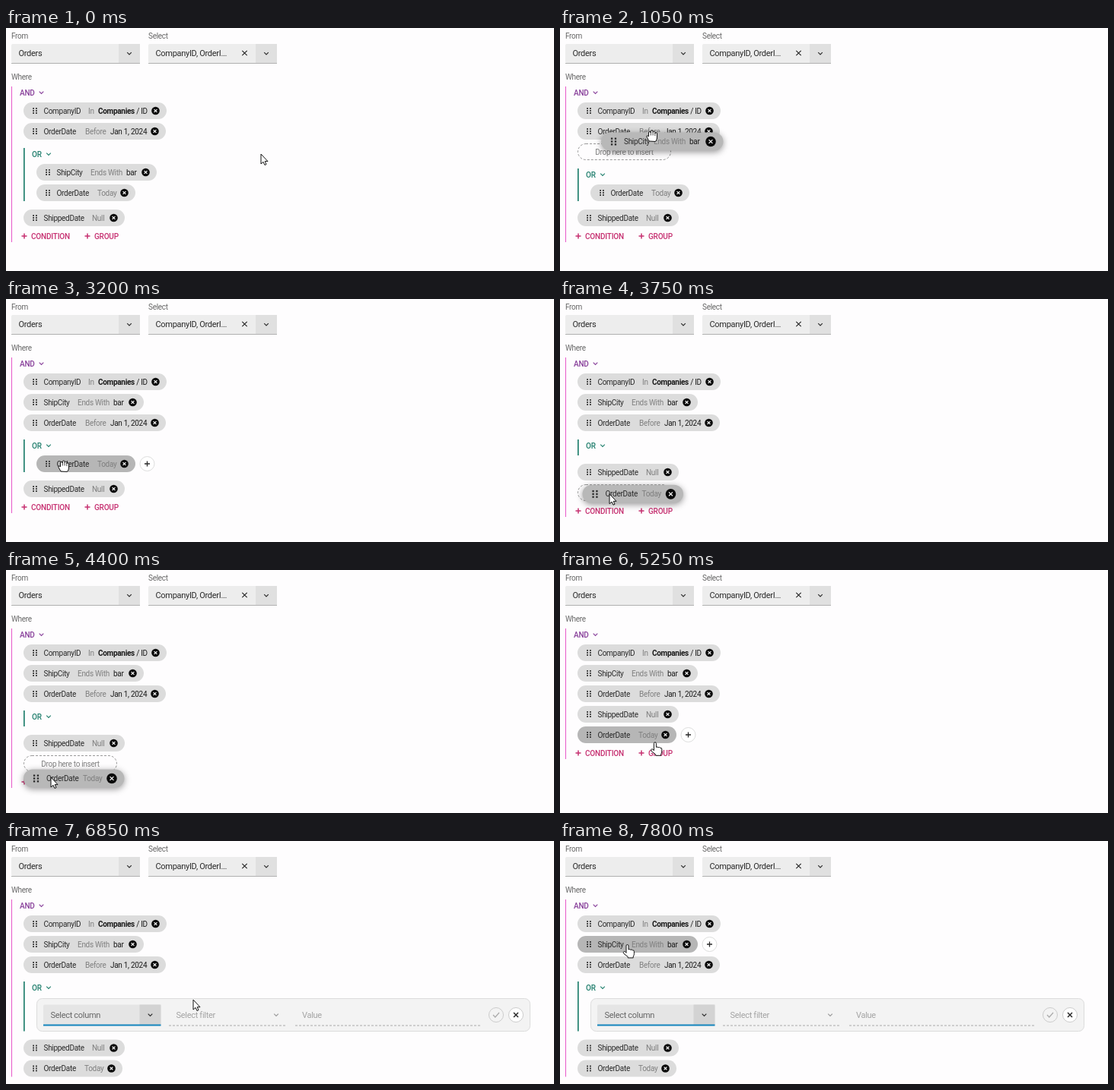
These frames come from a looping animation (720x320 px, 8000 ms). An HTML page:

```html
<!DOCTYPE html>
<html lang="en">
<head>
<meta charset="utf-8">
<title>Query builder</title>
<style>
  html, body { margin: 0; width: 100%; height: 100%; overflow: hidden; background: #fefdfe; }
  svg { display: block; width: 720px; height: 320px; }
  text { font: 10px Roboto, Arial, sans-serif; letter-spacing: -.3px; white-space: pre; }
  .field { font-size: 11px; }
  .caps { font-weight: 500; letter-spacing: -.2px; }
  .ghost { filter: drop-shadow(0 2px 4px #0006); }
  .menu { filter: drop-shadow(0 2px 3px #0003); }
</style>
</head>
<body>
<svg id="stage" viewBox="0 0 720 320"></svg>
<script>
const LOOP = 8000, STEP = 50;
const INK = '#2a2a2a', MUTED = '#7f7f7f', PINK = '#c62f70', PURPLE = '#883f9a', GREEN = '#23806f';

// Offsets are measured from the left end of each chip.
const company = { name: 'CompanyID', op: 'In', opX: 85, value: '<tspan font-weight="700">Companies</tspan> / ID', valueX: 98, w: 188 };
const ordered = { name: 'OrderDate', op: 'Before', opX: 81, value: 'Jan 1, 2024', valueX: 114, w: 187 };
const city = { name: 'ShipCity', op: 'Ends With', opX: 71, value: 'bar', valueX: 118, w: 158 };
const today = { name: 'OrderDate', op: 'Today', opX: 80, w: 130 };
const shipped = { name: 'ShippedDate', op: 'Null', opX: 90, w: 133 };
const slot = 'slot', editor = 'editor';

// Nested arrays are OR groups.
const queries = [
  [0, [company, ordered, [city, today], shipped]],
  [800, [company, ordered, [slot, today], shipped]],
  [950, [company, ordered, slot, [today], shipped]],
  [1350, [company, slot, ordered, [today], shipped]],
  [2000, [company, city, ordered, [today], shipped]],
  [3300, [company, city, ordered, [slot], shipped]],
  [3550, [company, city, ordered, [], shipped, slot]],
  [4950, [company, city, ordered, shipped, today]],
  [6650, [company, city, ordered, [editor], shipped, today]],
];

const drags = [
  { from: 800, to: 2000, chip: city, grip: 66 },
  { from: 3300, to: 4950, chip: today, grip: 36 },
];

const pointerPath = [
  [0, 335, 166], [300, 235, 180], [650, 106, 192], [800, 106, 190], [1000, 120, 148], [1050, 121, 142],
  [1150, 123, 134], [1500, 125, 131], [1800, 126, 132], [2050, 126, 132], [2750, 76, 214],
  [3200, 76, 220], [3300, 76, 218], [3650, 66, 254], [4350, 59, 273], [4950, 59, 273],
  [5700, 225, 159], [6100, 225, 159], [6500, 246, 208], [7450, 246, 211], [7800, 89, 137],
];

const clamp = v => Math.max(0, Math.min(1, v));

function pointerAt(t) {
  const next = pointerPath.findIndex(p => p[0] > t);
  if (next < 0) return pointerPath.at(-1).slice(1);
  const a = pointerPath[next - 1] || pointerPath[0], b = pointerPath[next];
  const k = b === a ? 0 : (t - a[0]) / (b[0] - a[0]);
  return [a[1] + (b[1] - a[1]) * k, a[2] + (b[2] - a[2]) * k];
}

const text = (x, y, s, fill = INK, cls = '', extra = '') =>
  `<text x="${x}" y="${y + 3.6}" fill="${fill}" class="${cls}" ${extra}>${s}</text>`;
const box = (x, y, w, h, fill, extra = '') =>
  `<rect x="${x}" y="${y}" width="${w}" height="${h}" fill="${fill}" ${extra}/>`;
const line = (x, y, d, color, width = 1, extra = '') =>
  `<path d="${d}" transform="translate(${x} ${y})" fill="none" stroke="${color}" stroke-width="${width}" ${extra}/>`;
const disc = (x, y, r, fill, stroke = 'none') =>
  `<circle cx="${x}" cy="${y}" r="${r}" fill="${fill}" stroke="${stroke}"/>`;
const chevron = (x, y, color = INK) => line(x, y, 'M-2.8-1.4 0 1.4 2.8-1.4', color, 1.15);
const plus = (x, y, color, width = 1.5) => line(x, y, 'M-3.5 0H3.5M0-3.5V3.5', color, width);
const cross = (x, y, r, color, width) => line(x, y, `M${-r} ${-r}L${r} ${r}M${r} ${-r}L${-r} ${r}`, color, width);

function combo(x, y, w, h, label, color, fill, endFill) {
  return box(x, y, w, h, fill, 'rx="2"') + box(x + w - 28, y, 28, h, endFill) +
    text(x + 9.5, y + h / 2, label, color, 'field') + chevron(x + w - 14, y + h / 2);
}

function header() {
  return text(7, 10, 'From', '#666') + text(187, 10, 'Select', '#666') + text(7, 64, 'Where', '#666') +
    combo(7, 21, 169, 25, 'Orders', INK, '#ededed', '#e0e0e0') +
    combo(187, 21, 169, 25, 'CompanyID, OrderI...', INK, '#ededed', '#e0e0e0') +
    cross(313.5, 33, 3.2, INK, 1.2) +
    line(7, 46.5, 'M0 0H169M180 0H349', '#b0b0b0');
}

function chipBody(c, x, y, fill, lifted) {
  const grow = lifted ? 1.28 : 1, w = c.w + (lifted ? 2.5 : 0), h = lifted ? 24 : 22;
  const shift = lifted ? -2 : 0, gripX = x + (lifted ? 16.5 : 15), closeX = x + w - (lifted ? 16.5 : 14.5);
  let out = box(x, y - h / 2, w, h, fill, `rx="${h / 2}"`);
  for (const dx of [-1.9, 1.9]) for (const dy of [-3, 0, 3])
    out += box(gripX + (dx - .9) * grow, y + (dy - .9) * grow, 1.8 * grow, 1.8 * grow, INK);
  out += text(x + (lifted ? 30 : 26.5), y, c.name) + text(x + c.opX + shift, y, c.op, MUTED);
  if (c.value) out += text(x + c.valueX + shift, y, c.value, '#1a1a1a');
  return out + disc(closeX, y, 5.3 * grow, '#0a0a0a') + cross(closeX, y, 1.9 * grow, '#fff', 1.2);
}

function chip(c, x, y, view) {
  const dx = view.pointer[0] - x, dy = Math.abs(view.pointer[1] - y);
  const near = !view.drag && dy < 11 && dx > 0 && dx < c.w + 26;
  const menuOwner = c === ordered && view.menu;
  if (near) view.hover = true;
  let out = chipBody(c, x, y, near && dx < c.w ? '#b6b6b6' : '#dcdcdc');
  if (near || menuOwner)
    out += disc(x + c.w + 15.5, y, 9.5, '#fff', '#ddd') + plus(x + c.w + 15.5, y, INK, 1.3);
  return out;
}

function dropSlot(x, y) {
  return box(x + .5, y - 10.5, 122, 21, 'none', 'rx="10.5" stroke="#999" stroke-dasharray="3 2"') +
    text(x + 61.5, y, 'Drop here to insert', MUTED, '', 'text-anchor="middle"');
}

function editRow(y) {
  const mid = y + 22;
  return box(40.5, y + .5, 648, 43, '#f3f3f3', 'rx="7" stroke="#dcdcdc"') +
    combo(49, y + 8.5, 154.5, 27, 'Select column', '#666', '#e5e5e5', '#d3d3d3') +
    box(49, y + 34.5, 154.5, 2, '#1485bd') +
    text(223.5, mid, 'Select filter', '#a3a3a3', 'field') + chevron(355, mid, '#999') +
    text(389, mid, 'Value', '#a3a3a3', 'field') +
    line(214, y + 36, 'M0 0H155M166 0H409', '#aaa', 1, 'stroke-dasharray="3 2"') +
    disc(644, mid, 9.5, '#f3f3f3', '#ccc') + line(644, mid, 'M-4 0-1.2 3 4-3', '#aaa', 1.2) +
    disc(670, mid, 9.5, '#fff', '#ccc') + cross(670, mid, 3, INK, 1.5);
}

function tree(items, view) {
  const row = (item, x, y) => item === slot ? dropSlot(x, y) : chip(item, x, y, view);
  let out = text(18, 85, 'AND', PURPLE, 'caps') + chevron(46.5, 85, PURPLE);
  let bottom = 93, gap = 5, editing = false;
  for (const item of items) {
    if (!Array.isArray(item)) {
      out += row(item, 23, bottom + gap + 11);
      bottom += gap + 22;
      gap = 5;
      continue;
    }
    const top = bottom + 11;
    out += text(34, top + 8, 'OR', GREEN, 'caps') + chevron(56, top + 8, GREEN);
    bottom = top + 21;
    item.forEach((child, i) => {
      if (child === editor) {
        editing = true;
        out += editRow(top + 22);
        bottom = top + 65.5;
      } else {
        out += row(child, 40, top + 32 + i * 27);
        bottom = top + 43 + i * 27;
      }
    });
    out += box(23, top, 1.7, bottom - top, GREEN);
    gap = 11;
  }
  if (!editing) {
    const y = bottom + 13;
    out += plus(24, y, PINK) + text(33, y, 'CONDITION', PINK, 'caps') +
      plus(107, y, PINK) + text(116, y, 'GROUP', PINK, 'caps');
    bottom = y + 8;
  }
  return out + box(7, 77, 1, bottom - 77, '#e858c9');
}

function menu(t) {
  const open = clamp((t - 5950) / 250), fade = 1 - clamp((t - 6600) / 150);
  if (!open || !fade) return '';
  const scale = .5 + .5 * open, alpha = Math.pow(open, 1.2) * fade;
  const over = pointerAt(t)[1];
  return `<g class="menu" opacity="${alpha}" transform="translate(216 173.3) scale(1 ${scale})">` +
    box(0, 0, 90, 46, '#fff', 'rx="3"') +
    (over > 175 ? box(0, over < 197 ? 1 : 23, 90, 22, '#eee') : '') +
    text(16, 12, 'Add condition') + text(16, 34, 'Add group') + '</g>';
}

const shapes = {
  arrow: 'M0 0V13L3 10.3 5 14.5 7 13.5 5.2 9.6H9Z',
  point: 'M-2 1Q-2-.5-.5-.5T1 1V6q1.5-1 2.8 .3 1.6-.8 2.6 .6 2-.4 2 1.6v3q0 2-1.2 3.7v1.7h-7v-1.5L-5 11.5q-1.6-2.4 .2-3.2 1-.4 2.8 2Z',
  grab: 'M-4 7-7 1.5q-.6-2 1.4-1.6L-4.5 1V-4q0-1.6 1.4-1.6T-1.7-4V-5.5q0-1.6 1.4-1.6T1.1-5.5v1q0-1.4 1.4-1.4T3.9-4.5V-3q0-1.3 1.3-1.3T6.5-3V2Q6.5 5 4.5 7.5Z',
};

function cursor(t, view) {
  const [x, y] = view.pointer;
  const grabbing = t >= 700 && t < 1300 || t >= 2950 && t < 3650;
  const pointing = view.drag ? view.drag.chip === city : view.hover || view.menu;
  const kind = grabbing ? 'grab' : pointing ? 'point' : 'arrow';
  return `<path d="${shapes[kind]}" transform="translate(${x} ${y})" fill="#fff" stroke="#111" stroke-linejoin="round"/>` +
    (kind === 'grab' ? line(x, y, 'M-1.7-4V-.5M1.1-4.5V-.5M3.9-3V0', '#111', .8) : '');
}

function scene(t) {
  const view = {
    pointer: pointerAt(t),
    drag: drags.find(d => t >= d.from && t < d.to),
    menu: t >= 5900 && t < 6650,
    hover: false,
  };
  let out = header() + tree(queries.findLast(q => q[0] <= t)[1], view);
  if (view.drag) {
    // The lifted chip trails the pointer by one step.
    const [x, y] = pointerAt(t - STEP);
    out += `<g class="ghost">${chipBody(view.drag.chip, x - view.drag.grip, y + 1.5, '#b8b8b8', true)}</g>`;
  }
  return out + menu(t) + cursor(t, view);
}

const stage = document.getElementById('stage');
let shown = -1;
function tick() {
  const t = Math.floor(performance.now() % LOOP / STEP) * STEP;
  if (t !== shown) stage.innerHTML = scene(shown = t);
  requestAnimationFrame(tick);
}
tick();
</script>
</body>
</html>
```
